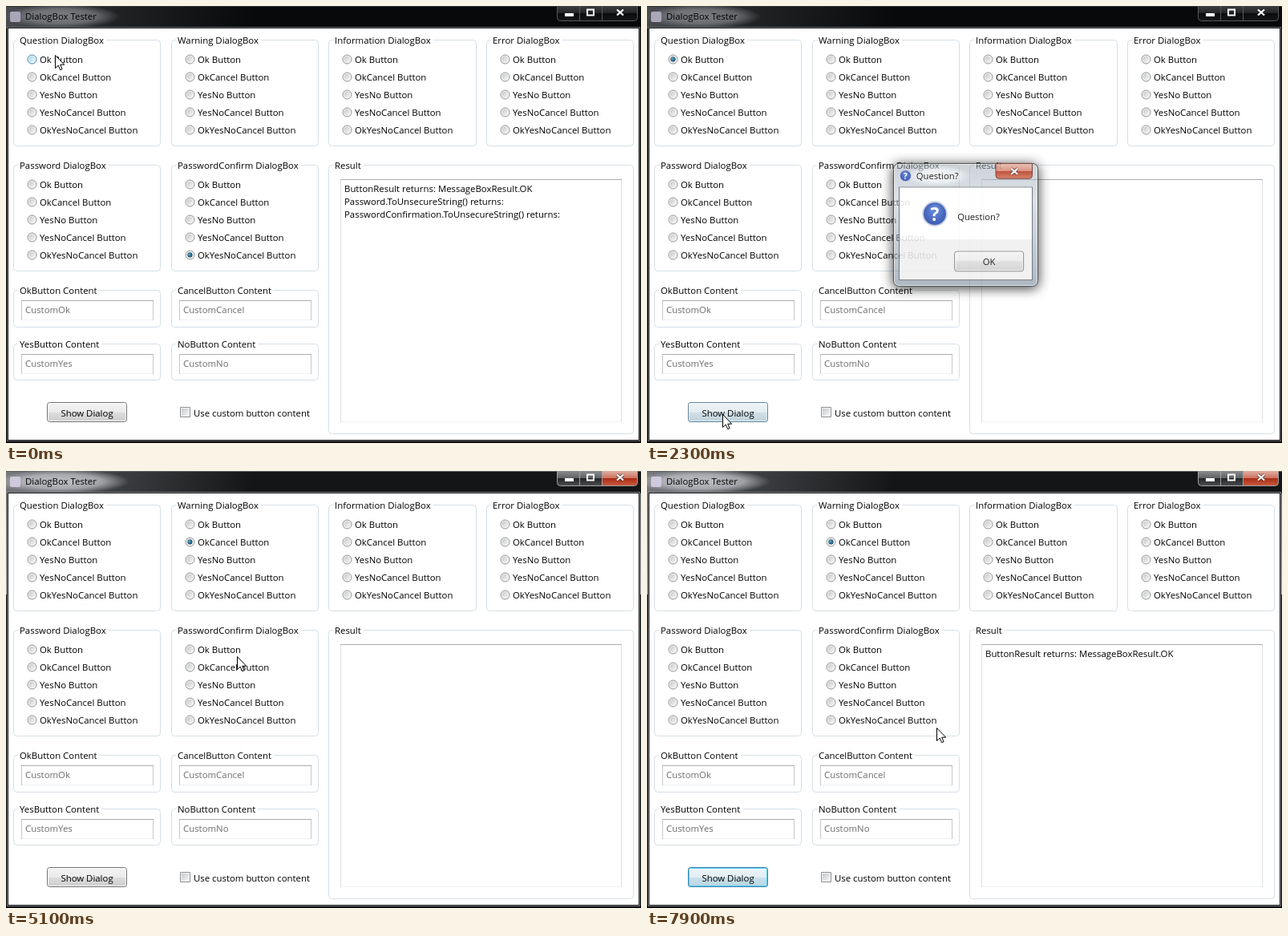
These frames come from a looping animation (792x545 px, 8 s). An HTML page with a canvas:

```html
<!DOCTYPE html>
<html lang="en">
<head>
<meta charset="utf-8">
<title>DialogBox Tester</title>
<style>
html, body { margin: 0; width: 792px; height: 545px; overflow: hidden; background: #000; }
canvas { display: block; }
</style>
</head>
<body>
<canvas id="stage" width="792" height="545"></canvas>
<script>
const W = 792, H = 545, LOOP = 8000;
const main = document.getElementById('stage').getContext('2d');
const layerCanvas = document.createElement('canvas');
layerCanvas.width = W;
layerCanvas.height = H;
const layer = layerCanvas.getContext('2d');
let c = main;

const FONT = '11.4px "Open Sans", "Noto Sans", sans-serif';
const GREY = ['#f3f3f3', '#ebebeb', '#dddddd', '#cdcdcd'];
const HOVER = { face: ['#eaf6fd', '#d9f0fc', '#bee6fd', '#a7d9f5'], ring: 'rgba(200,240,255,.8)' };
const FOCUS = { face: ['#eef5f8', '#e1eef4', '#cbe2ec', '#b5d4e2'], ring: '#46d0f4' };

// Screen refreshes: start, end, number of updates.
const RUNS = [[500, 1280, 11], [1350, 2150, 11], [2220, 2990, 11], [3080, 3850, 11],
  [3940, 4710, 11], [4780, 5550, 11], [5630, 6340, 10], [6480, 6890, 6],
  [7030, 7030, 1], [7410, 7900, 7]];

// Pointer path: time, x, y.
const PATH = [[740, 62, 62], [1040, 66, 123], [1350, 80, 345], [1740, 95, 510], [2300, 95, 510],
  [2900, 429, 317], [3310, 429, 317], [3850, 336, 170], [4300, 263, 86], [4850, 263, 86],
  [5090, 290, 238], [5620, 111, 507], [6400, 111, 507], [6880, 362, 321]];

const DIALOGS = [
  { open: 2100, arrive: 2900, close: 3300, x: 306, w: 183, text: 'Question?', icon: questionIcon, buttons: ['OK'] },
  { open: 6050, arrive: 6880, close: 7490, x: 273, w: 249, text: 'Warning!', icon: warningIcon, buttons: ['OK', 'Cancel'] }
];
const DTOP = 195, DH = 156, FADE = 250;
const PICK_A = 640, PICK_B = 4850;

const clamp = v => Math.max(0, Math.min(1, v));

function snap(t) {
  let last = 0;
  for (const [a, b, n] of RUNS) {
    for (let i = 0; i < n; i++) {
      const raw = n > 1 ? a + (b - a) * i / (n - 1) : a;
      const tick = i ? Math.floor((raw - 5) / 10) * 10 : a;
      if (tick <= t) last = tick;
    }
  }
  return last;
}

function pointer(t) {
  if (t <= PATH[0][0]) return PATH[0].slice(1);
  for (let i = 1; i < PATH.length; i++) {
    const [t0, x0, y0] = PATH[i - 1], [t1, x1, y1] = PATH[i];
    if (t < t1) {
      const k = (t - t0) / (t1 - t0);
      return [Math.round(x0 + (x1 - x0) * k), Math.round(y0 + (y1 - y0) * k)];
    }
  }
  return PATH[PATH.length - 1].slice(1);
}

function text(s, x, y, color = '#000', align = 'left') {
  c.font = FONT;
  c.fillStyle = color;
  c.textAlign = align;
  c.fillText(s, x, y);
}

function rect(x, y, w, h, color) {
  c.fillStyle = color;
  c.fillRect(x, y, w, h);
}

function round(x, y, w, h, r, fill, stroke) {
  c.beginPath();
  c.roundRect(x, y, w, h, r);
  if (fill) { c.fillStyle = fill; c.fill(); }
  if (stroke) { c.strokeStyle = stroke; c.lineWidth = 1; c.stroke(); }
}

// Vertical gradient; stops are [position, colour].
function shade(y0, y1, ...stops) {
  const g = c.createLinearGradient(0, y0, 0, y1);
  for (const [p, color] of stops) g.addColorStop(p, color);
  return g;
}

const gloss = (y, h, [a, b, d, e]) => shade(y, y + h, [0, a], [0.5, b], [0.5, d], [1, e]);

function glow(x, y, rx, ry, rgb, alpha) {
  c.save();
  c.translate(x, y);
  c.scale(rx, ry);
  const g = c.createRadialGradient(0, 0, 0, 0, 0, 1);
  g.addColorStop(0, `rgba(${rgb},${alpha})`);
  g.addColorStop(0.6, `rgba(${rgb},${alpha * 0.75})`);
  g.addColorStop(1, `rgba(${rgb},0)`);
  c.fillStyle = g;
  c.fillRect(-1, -1, 2, 2);
  c.restore();
}

function cross(x, y, color, edge) {
  c.lineCap = 'butt';
  for (const [width, style] of [[4, edge], [2.2, color]]) {
    c.lineWidth = width;
    c.strokeStyle = style;
    c.beginPath();
    c.moveTo(x - 4, y - 3.5); c.lineTo(x + 4, y + 3.5);
    c.moveTo(x + 4, y - 3.5); c.lineTo(x - 4, y + 3.5);
    c.stroke();
  }
}

function button(label, x, y, w, h, amount, style = HOVER) {
  const paint = (colors, edge, ring) => {
    round(x + 0.5, y + 0.5, w - 1, h - 1, 3, gloss(y, h, colors), edge);
    round(x + 1.5, y + 1.5, w - 3, h - 3, 2, null, ring);
  };
  paint(GREY, '#707070', 'rgba(255,255,255,.8)');
  if (amount > 0) {
    const old = c.globalAlpha;
    c.globalAlpha = old * amount;
    paint(style.face, '#3c7fb1', style.ring);
    c.globalAlpha = old;
  }
  text(label, x + w / 2, y + 18, '#000', 'center');
}

function radio(x, y, on, hot) {
  const g = c.createLinearGradient(x - 4, y - 4, x + 4, y + 4);
  g.addColorStop(0, hot ? '#a5d5ee' : '#c3c7cb');
  g.addColorStop(1, hot ? '#f0faff' : '#f8f8f8');
  c.beginPath();
  c.arc(x, y, 5.5, 0, 7);
  c.fillStyle = '#f6f6f6';
  c.fill();
  c.strokeStyle = hot ? '#3c7fb1' : '#8e8f8f';
  c.lineWidth = 1;
  c.stroke();
  c.beginPath();
  c.arc(x, y, 4, 0, 7);
  c.fillStyle = g;
  c.fill();
  if (!on) return;
  const dot = c.createRadialGradient(x - 1, y - 1, 0, x, y, 3.2);
  dot.addColorStop(0, hot ? '#8fe0fb' : '#5fb9dc');
  dot.addColorStop(1, hot ? '#1b6f9c' : '#123f5c');
  c.beginPath();
  c.arc(x, y, 3, 0, 7);
  c.fillStyle = dot;
  c.fill();
}

function group(label, x, y, w, h) {
  round(x + 0.5, y + 0.5, w - 1, h - 1, 4, null, '#d5dfe5');
  c.font = FONT;
  rect(x + 6, y - 2, c.measureText(label).width + 5, 5, '#fff');
  text(label, x + 8, y + 5);
}

function field(x, y, w, h, side = '#c4c8cc') {
  rect(x, y, w, h, '#eef1f4');
  rect(x, y, 1, h, side);
  rect(x + w - 1, y, 1, h, side);
  rect(x + 1, y + 1, w - 2, h - 2, '#fff');
  rect(x, y, w, 1, '#abadb3');
}

function titleBar(active) {
  rect(0, 0, W, H, '#000');
  const sheen = c.createLinearGradient(0, 0, 300, 60);
  sheen.addColorStop(0, active ? '#77797d' : '#4a4c50');
  sheen.addColorStop(0.45, active ? '#3c3e41' : '#202224');
  sheen.addColorStop(1, active ? '#141516' : '#08090a');
  rect(0, 0, W, 28, sheen);
  rect(0, 0, W, 1, active ? '#5c5e60' : '#333');
  glow(70, 13, active ? 84 : 72, 15, active ? '210,211,216' : '150,151,156', active ? 0.85 : 0.75);
  round(5, 7, 13, 13, 2, active ? '#cfc8de' : '#aaa5b8');
  text('DialogBox Tester', 24, 17);

  const dark = ['#3c3e40', '#232425', '#0a0a0b', '#161718'];
  const grey = ['#8a8c8e', '#5f6163', '#232425', '#4a4c4e'];
  const red = ['#e0b0a4', '#cc6f5c', '#a82b14', '#c8583c'];
  const edge = active ? '#a0a2a4' : '#55585a';
  c.beginPath();
  c.roundRect(687.5, -3, 100, 21, 4);
  c.save();
  c.clip();
  rect(687, 0, 56, 19, gloss(0, 18, active ? grey : dark));
  rect(743, 0, 46, 19, gloss(0, 18, active ? red : dark));
  rect(715, 0, 1, 19, edge);
  rect(743, 0, 1, 19, edge);
  c.restore();
  round(687.5, -3.5, 100, 22, 4, null, edge);
  rect(697, 9, 11, 4, '#fff');
  c.strokeStyle = '#fff';
  c.lineWidth = 2;
  c.strokeRect(725, 4.5, 8, 7);
  cross(766, 8, '#fff', 'rgba(30,30,30,.6)');

  if (active) {
    const side = shade(28, 155, [0, '#5a5c5e'], [1, '#8c8e90']);
    rect(0, 28, 1, 126, side);
    rect(791, 28, 1, 126, side);
  }
  rect(1, 26, 790, 517, active ? '#7c7f82' : '#606366');
  rect(2, 27, 788, 515, '#1c1d1e');
  rect(3, 28, 786, 513, '#fff');
}

function form(t, px, py, modal) {
  const names = ['Question', 'Warning', 'Information', 'Error', 'Password', 'PasswordConfirm'];
  const options = ['Ok', 'OkCancel', 'YesNo', 'YesNoCancel', 'OkYesNoCancel'];
  const picked = t < PICK_A ? 54 : t < PICK_B ? 0 : 11;
  const left = [9, 206, 402, 599];
  names.forEach((name, i) => {
    const x = left[i % 4], y = i < 4 ? 42 : 198;
    group(name + ' DialogBox', x, y, i % 4 === 2 ? 185 : 184, 133);
    options.forEach((option, j) => {
      const cy = y + 24.5 + j * 22, cx = x + 23.5, id = i * 10 + j;
      const over = !modal && px > cx - 6 && px < cx + 130 && Math.abs(py - cy) < 8;
      const fresh = id === 0 && t >= PICK_A && t < 1200;
      radio(cx, cy, id === picked, over || fresh);
      text(option + ' Button', x + 33, cy + 4.5);
    });
  });
  ['Ok', 'Cancel', 'Yes', 'No'].forEach((name, i) => {
    const x = left[i % 2], y = i < 2 ? 354 : 421;
    group(name + 'Button Content', x, y, 184, i < 2 ? 47 : 46);
    field(x + 10, y + 13, 165, 25);
    text('Custom' + name, x + 15, y + 29, '#6d6d6d');
  });

  group('Result', 402, 198, 381, 336);
  field(417, 216, 351, 303, '#dde1e5');
  const done = (t >= 3390 && t < PICK_B) || t >= 7560;
  if (t < PICK_A || done) text('ButtonResult returns: MessageBoxResult.OK', 422, 232);
  if (t < PICK_A) {
    text('Password.ToUnsecureString() returns:', 422, 248);
    text('PasswordConfirmation.ToUnsecureString() returns:', 422, 264);
  }

  const over = px > 51 && px < 151 && py > 494 && py < 519;
  const since = t >= 7490 ? t - 7490 : t >= 3300 && t < PICK_B ? t - 3300 : 0;
  if (over) button('Show Dialog', 51, 494, 100, 25, modal ? 0.35 : 1);
  else button('Show Dialog', 51, 494, 100, 25, Math.abs(Math.sin(Math.PI * since / 1000)), FOCUS);

  round(217.5, 500.5, 12, 12, 0, '#f4f4f4', '#8e8f8f');
  const box = c.createLinearGradient(219, 502, 228, 511);
  box.addColorStop(0, '#c6cace');
  box.addColorStop(1, '#f6f6f6');
  rect(219, 502, 9, 9, box);
  text('Use custom button content', 234, 512);
}

function questionIcon(x, y, s) {
  const g = c.createRadialGradient(x, y - s * 0.25, 0, x, y, s / 2);
  g.addColorStop(0, '#5b84e0');
  g.addColorStop(1, '#1c3fa4');
  c.beginPath();
  c.arc(x, y, s / 2 - s * 0.03, 0, 7);
  c.fillStyle = g;
  c.fill();
  c.strokeStyle = '#c3cbdc';
  c.lineWidth = s * 0.06;
  c.stroke();
  c.font = `bold ${s * 0.72}px "Open Sans", sans-serif`;
  c.textAlign = 'center';
  c.fillStyle = '#fff';
  c.fillText('?', x, y + s * 0.27);
}

function warningIcon(x, y, s) {
  c.beginPath();
  c.moveTo(x, y - s * 0.4);
  c.lineTo(x + s * 0.43, y + s * 0.41);
  c.lineTo(x - s * 0.43, y + s * 0.41);
  c.closePath();
  c.lineJoin = 'round';
  c.lineWidth = s * 0.1;
  c.strokeStyle = '#b9a36a';
  c.stroke();
  c.fillStyle = shade(y - s * 0.4, y + s * 0.4, [0, '#ffe768'], [1, '#f7b500']);
  c.fill();
  round(x - s * 0.06, y - s * 0.17, s * 0.12, s * 0.34, s * 0.05, '#222');
  c.beginPath();
  c.arc(x, y + s * 0.28, s * 0.065, 0, 7);
  c.fill();
}

function dialogBody(d, t, active) {
  const { x, w } = d, y = DTOP, right = x + w;
  c.save();
  c.beginPath();
  c.rect(0, 0, W, H);
  c.roundRect(x, y, w, DH, 7);
  c.clip('evenodd');
  c.shadowColor = active ? 'rgba(0,0,0,.9)' : 'rgba(0,0,0,.35)';
  c.shadowBlur = active ? 15 : 9;
  c.shadowOffsetY = 2;
  round(x, y, w, DH, 7, '#000');
  c.restore();

  const glass = active
    ? shade(y, y + DH, [0, 'rgba(160,170,182,.6)'], [0.3, 'rgba(185,198,210,.6)'], [1, 'rgba(125,142,160,.72)'])
    : shade(y, y + DH, [0, 'rgba(215,222,229,.6)'], [1, 'rgba(205,214,222,.7)']);
  round(x + 0.5, y + 0.5, w - 1, DH - 1, 7, glass, active ? '#26292c' : '#3f4347');
  round(x + 1.5, y + 1.5, w - 3, DH - 3, 6, null, 'rgba(255,255,255,.65)');

  glow(x + 56, y + 16, 42, 13, '255,255,255', 0.8);
  d.icon(x + 15.5, y + 16, 15);
  text(d.text, x + 29, y + 20);

  const bx = right - 54;
  const face = active
    ? gloss(y + 1, 19, ['#e8b9ad', '#d5806f', '#b53a22', '#d5765a'])
    : 'rgba(240,243,246,.45)';
  round(bx + 0.5, y + 0.5, 46, 19, [0, 0, 4, 4], face, active ? '#6b2a20' : '#8b9299');
  cross(bx + 24, y + 10.5, '#fff', active ? 'rgba(70,30,25,.75)' : '#70777d');

  rect(x + 7, y + 30, w - 14, 118, '#5c636a');
  rect(x + 8, y + 31, w - 16, 116, '#f0f0f0');
  rect(x + 8, y + 31, w - 16, 65, '#fff');
  d.icon(x + 52.5, y + 64, 32);
  text(d.text, x + 81, y + 72);

  const hover = clamp((t - d.arrive + 80) / 220);
  const n = d.buttons.length;
  d.buttons.forEach((label, i) => {
    button(label, right - 18 - 88 - (n - 1 - i) * 97, y + 111, 88, 26, i === 0 ? hover : 0);
  });
}

function dialog(d, t) {
  if (t < d.open || t >= d.close + FADE) return;
  const closing = t >= d.close;
  const k = closing ? 1 - (t - d.close) / FADE : clamp((t - d.open) / FADE);
  const scale = 0.95 + 0.05 * k;
  const cx = d.x + d.w / 2, cy = DTOP + DH / 2;
  c = layer;
  c.clearRect(0, 0, W, H);
  c.save();
  c.translate(cx, cy);
  c.scale(scale, scale);
  c.translate(-cx, -cy);
  dialogBody(d, t, !closing);
  c.restore();
  c = main;
  c.globalAlpha = Math.sqrt(k);
  c.drawImage(layerCanvas, 0, 0);
  c.globalAlpha = 1;
}

function arrow(x, y) {
  const pts = [[0, 0], [0, 16], [3.7, 12.6], [6.2, 18.2], [8.6, 17.2], [6.2, 11.7], [11.2, 11.7]];
  c.beginPath();
  for (const [dx, dy] of pts) c.lineTo(x - 0.5 + dx, y - 0.5 + dy);
  c.closePath();
  c.lineJoin = 'miter';
  c.lineWidth = 1;
  c.fillStyle = '#fff';
  c.fill();
  c.strokeStyle = '#000';
  c.stroke();
}

function beam(x, y) {
  rect(x, y - 7, 1, 15, '#000');
  for (const dy of [-8, 8]) {
    rect(x - 3, y + dy, 3, 1, '#000');
    rect(x + 1, y + dy, 3, 1, '#000');
  }
}

function draw(t) {
  const [px, py] = pointer(t);
  const modal = DIALOGS.some(d => t >= d.open - 20 && t < d.close);
  titleBar(t >= 570 && !modal);
  form(t, px, py, modal);
  for (const d of DIALOGS) dialog(d, t);
  const typing = !modal && px > 417 && px < 768 && py > 216 && py < 518;
  (typing ? beam : arrow)(px, py);
}

const start = performance.now();
function frame() {
  draw(snap((performance.now() - start) % LOOP));
  requestAnimationFrame(frame);
}
frame();
</script>
</body>
</html>
```
